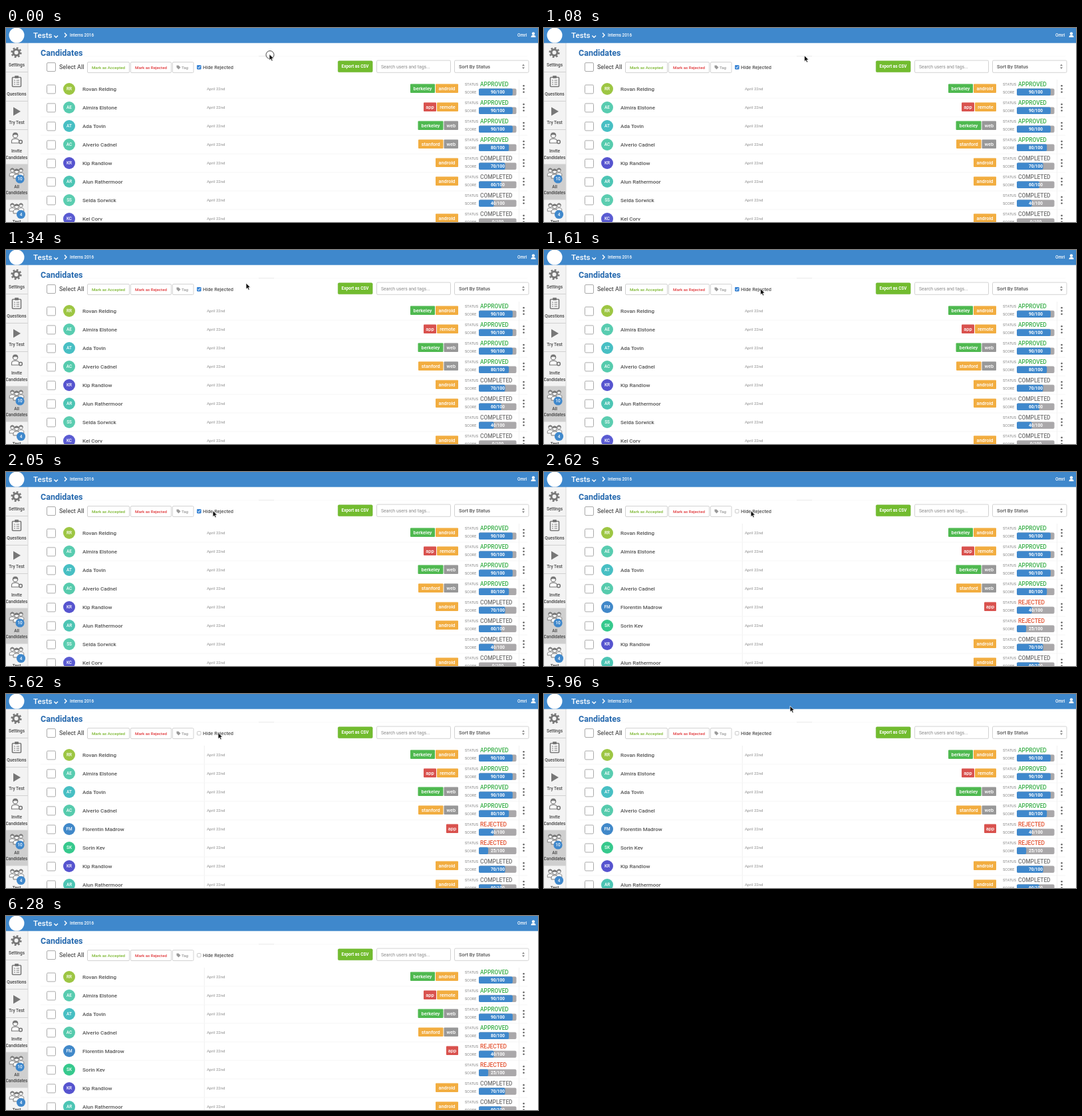
Write an HTML page that moves like this. It is 800 by 293 pixels and loops after 7.62 s.

```html
<!DOCTYPE html>
<html lang="en">
<head>
<meta charset="utf-8">
<title>Candidates</title>
<style>
  html, body { margin: 0; width: 100%; height: 100%; overflow: hidden; background: #fff; }
  svg { display: block; width: 100%; height: 100%; font-family: Roboto, "Open Sans", sans-serif; font-weight: 500; }
</style>
</head>
<body>
<svg id="stage" viewBox="0 0 800 293"></svg>
<script>
const LOOP = 7620;
const BLUE = '#3f88cc', GREEN = '#4fb950', ORANGE = '#f2ad40', RED = '#d9524e', GREY = '#989898';
const BOLD = 'font-weight="600"', PLAIN = 'font-weight="400"';
const TAG_COLORS = { berkeley: GREEN, android: ORANGE, app: RED, remote: ORANGE, web: GREY, stanford: ORANGE };
const STATUS_COLORS = { APPROVED: '#35ad45', REJECTED: '#e4512f', COMPLETED: '#727272' };

// Tags are [name, left, right].
const android = ['android', 646, 680], web = ['web', 658.5, 680];
const candidates = [
  ['Rovan Relding', '#9dc643', 'APPROVED', 90, [['berkeley', 608, 645], android]],
  ['Almira Elstone', '#58ccb0', 'APPROVED', 90, [['app', 628, 647], ['remote', 648, 680]]],
  ['Ada Tovin', '#47bfc3', 'APPROVED', 90, [['berkeley', 619.5, 657.5], web]],
  ['Alverio Cadnel', '#56cbad', 'APPROVED', 80, [['stanford', 620, 657.5], web]],
  ['Florentin Madrow', '#4088c9', 'REJECTED', 40, [['app', 662, 680]]],
  ['Sorin Kev', '#36c98d', 'REJECTED', 25, []],
  ['Kip Randlow', '#5654cf', 'COMPLETED', 70, [android]],
  ['Alun Rathermoor', '#4cc5b4', 'COMPLETED', 60, [android]],
  ['Selda Sorwick', '#5bcdb0', 'COMPLETED', 40, []],
  ['Kel Corv', '#5a5bd2', 'COMPLETED', 0, [android]]
].map(([name, color, status, score, tags]) => ({ name, color, status, score, tags }));

const rect = (x, y, w, h, fill, more = '') =>
  `<rect x="${x}" y="${y}" width="${w}" height="${h}" fill="${fill}" ${more}/>`;
const circle = (x, y, r, fill, more = '') =>
  `<circle cx="${x}" cy="${y}" r="${r}" fill="${fill}" ${more}/>`;
const path = (d, more) => `<path d="${d}" ${more}/>`;
const text = (x, y, size, fill, content, more = '') =>
  `<text x="${x}" y="${y}" font-size="${size}" fill="${fill}" ${more}>${content}</text>`;
const centred = (x, y, size, fill, content, more = '') =>
  text(x, y, size, fill, content, 'text-anchor="middle" ' + more);
const box = (x, y, w, h, stroke = '#d2d2d2', fill = '#fff') =>
  rect(x, y, w, h, fill, `stroke="${stroke}" rx="1.5"`);
const line = (d, stroke, width = 1) =>
  path(d, `fill="none" stroke="${stroke}" stroke-width="${width}"`);

function row(person, index) {
  const y = 92 + index * 28;
  const initials = person.name.split(' ').map(word => word[0]).join('');
  const tags = person.tags.map(([name, left, right]) =>
    rect(left, y - 7.6, right - left, 13.6, TAG_COLORS[name], 'rx="1"') +
    centred((left + right) / 2, y + 1.5, 7.4, '#fff', name)).join('');
  return line(`M52 ${y + 14}H784`, '#f6f6f6') + box(61.5, y - 6, 13, 13, '#aaa') +
    circle(95, y, 9, person.color) + centred(95, y + 2.4, 6.4, '#fff', initials) +
    text(115, y + 3.2, 8, '#555', person.name) +
    text(302, y + 1.5, 6, '#a4a4a4', 'April 22nd') + tags +
    text(690, y - 4.8, 5.6, '#808080', 'STATUS', PLAIN) +
    text(690, y + 7, 5.6, '#808080', 'SCORE', PLAIN) +
    text(713, y - 4, 8.4, STATUS_COLORS[person.status], person.status) +
    rect(711, y - .6, 56.5, 10.6, '#aaa8aa', 'rx="2"') +
    rect(711, y - .6, 56.5 * person.score / 100, 10.6, BLUE, 'rx="2"') +
    centred(739.5, y + 6.9, 6.5, '#fff', person.score + '/100', BOLD) +
    [-4.7, 0, 4.7].map(dy => circle(778.5, y + dy, 1.3, '#666')).join('');
}

const person = (x, y, scale = 1) => `<g transform="translate(${x} ${y}) scale(${scale})" stroke="#777">` +
  path('M-5 8V5Q-5 2 0 2Q5 2 5 5V8Z', 'fill="#f8f8f8"') + circle(0, -2.5, 3.3, '#f8f8f8') +
  path('M-3.3 -3Q-3 -6 0 -6Q3 -6 3.3 -3Q0 -5 -3.3 -3Z', 'fill="#777"') + '</g>';
const people = y => person(9.5, y - 1, .85) + person(22.5, y - 1, .85) + person(16, y + 1);
const badge = (x, y, n) => circle(x, y, 6.6, BLUE) + centred(x, y + 2.4, 6.4, '#fff', n);

function sidebar() {
  const label = (y, content) => centred(16, y, 6.5, '#444', content);
  const gear = circle(15.5, 37, 6.8, 'none', 'stroke="#777" stroke-width="2.6" stroke-dasharray="2.67"') +
    circle(15.5, 37, 4.5, 'none', 'stroke="#777" stroke-width="3"');
  const clipboard = rect(9.5, 74.5, 13, 14, '#f8f8f8', 'stroke="#777" stroke-width="1.6" rx="1"') +
    rect(13, 72, 6, 4, '#777', 'rx="1"') +
    line('M12 79H14M15.5 79H20M12 82H14M15.5 82H20M12 85H14M15.5 85H20', '#777', 1.1);
  return rect(0, 22, 33, 271, '#f3f3f3') + rect(0, 206, 33, 53, '#cfcfcf') +
    line('M0 66.5H33M0 110.5H33M0 153.5H33M0 206H33M0 259H33', '#d0d0d0') +
    line('M33 22V293', '#d6d6d6') +
    gear + label(58, 'Settings') + clipboard + label(101.5, 'Questions') +
    path('M11 119.5L22 126L11 132.5Z', 'fill="#777"') + label(145, 'Try Test') +
    person(14, 165, 1.1) + circle(22, 172, 2.4, '#f3f3f3', 'stroke="#777" stroke-width="1.5"') +
    label(188, 'Invite') + label(198, 'Candidates') +
    people(218) + badge(21, 228, 10) + label(242, 'All') + label(251, 'Candidates') +
    people(271) + badge(22.5, 281.5, 4) + label(295, 'Test');
}

function header() {
  return rect(0, 0, 800, 22.7, BLUE) + circle(16, 11, 11.5, '#fff') +
    text(41, 15.2, 11.6, '#fff', 'Tests') +
    line('M72.4 11.4L75.2 14.2L78 11.4', '#fff', 1.4) + line('M88 7.5L91 10.7L88 14', '#fff', 1.4) +
    text(96, 13, 6.4, '#fff', 'Interns 2016') + text(769, 13, 6.6, '#fff', 'Omri') +
    circle(793, 8.5, 2.2, '#fff') + path('M789.5 14Q789.5 10.8 793 10.8Q796.5 10.8 796.5 14Z', 'fill="#fff"');
}

function toolbar() {
  return text(52, 42, 12.5, '#2468ae', 'Candidates', BOLD) +
    line('M52 42.5H784', '#f6f6f6', .6) + line('M380 42.5H403', '#ddd', .6) +
    box(61.5, 52.5, 13, 13, '#aaa') + text(80, 62.3, 8.9, '#555', 'Select All') +
    box(122.5, 51.5, 63, 16) + centred(154, 61.5, 6.2, '#79b52c', 'Mark as Accepted') +
    box(187.5, 51.5, 61, 16) + centred(218, 61.5, 6.2, '#e0373a', 'Mark as Rejected') +
    box(250.5, 51.5, 31.5, 16) + text(264, 61.5, 6.2, '#999', 'Tag') +
    path('M256.5 56.5H259.5L262.5 59.5L259.5 62.5L256.5 59.5Z', 'fill="#999"') +
    text(296, 62, 7.4, '#555', 'Hide Rejected') +
    rect(499.3, 49.8, 51.8, 16.8, '#72bc2f', 'rx="1.5" stroke="#69b02b" stroke-width=".6"') +
    centred(525, 60.4, 6.4, '#fff', 'Export as CSV', BOLD) +
    box(557.5, 49, 111, 18.3) + text(564, 60.8, 6.9, '#8a8a8a', 'Search users and tags...', PLAIN) +
    box(674.5, 49, 111.5, 18.3) + text(681, 60.8, 7.4, '#555', 'Sort By Status') +
    path('M776 57.3L778 54.6L780 57.3ZM776 59.3L778 62L780 59.3Z', 'fill="#888"');
}

const visible = candidates.filter(person => person.status !== 'REJECTED');
document.getElementById('stage').innerHTML =
  rect(0, 0, 800, 293, '#fff') + toolbar() +
  line('M771.5 78V293', '#f1f1f1') +
  `<g id="filtered">${visible.map(row).join('')}</g>` +
  `<g id="everyone">${line('M298.3 78V293', '#f0f0f0')}${candidates.slice(0, 8).map(row).join('')}</g>` +
  rect(287.5, 56.5, 5.5, 5.5, '#fff', 'stroke="#bbb" stroke-width=".8" rx="1"') +
  `<g id="check">${rect(287, 56, 6.5, 6.5, '#3b86d6', 'rx="1.2"')}${line('M288.5 59.3L289.8 60.8L292 57.6', '#fff', 1)}</g>` +
  sidebar() + header() +
  `<g id="cursor">${circle(1, 1, 6, 'none', 'id="ring" stroke="#333" stroke-width=".9"')}` +
  path('M0 0V9.2L2.1 7.3L3.6 10.4L5.2 9.7L3.8 6.6H6.6Z', 'fill="#111" stroke="#fff" stroke-width=".7"') + '</g>';

const [filtered, everyone, check, cursor, ring] =
  ['filtered', 'everyone', 'check', 'cursor', 'ring'].map(id => document.getElementById(id));

// The pointer jumps at these times, along the path of [time, x, y] below.
const steps = [0, 1080, 1160, 1250, 1340, 1430, 1520, 1610, 1700, 1790, 1880, 1960, 2050,
  5620, 5730, 5840, 5960, 6110];
const route = [[0, 396, 39.5], [1000, 396, 39.5], [1080, 391.5, 41.5], [1250, 376, 46], [1430, 346, 54],
  [1610, 325.5, 58.5], [1790, 316, 59.5], [2050, 311, 58.5], [5500, 311, 58.5], [5620, 319, 58.5],
  [5840, 350, 34], [5960, 370, 18], [6110, 384, 6]];

function pointerAt(time) {
  const held = steps.filter(step => step <= time).pop();
  const next = route.findIndex(point => point[0] >= held);
  const b = route[next], a = route[Math.max(0, next - 1)];
  const k = b === a ? 0 : (held - a[0]) / (b[0] - a[0]);
  return [a[1] + (b[1] - a[1]) * k, a[2] + (b[2] - a[2]) * k];
}

const show = (node, on) => node.setAttribute('display', on ? 'inline' : 'none');

function render(time) {
  const hiding = time < 2620;
  show(filtered, hiding);
  show(check, hiding);
  show(everyone, !hiding);
  show(cursor, time < 6280);
  show(ring, time < 90 || (time >= 2320 && time < 2620));
  ring.setAttribute('opacity', time >= 2320 && time < 2440 ? .7 : 1);
  cursor.setAttribute('transform', `translate(${pointerAt(time).join(' ')})`);
}

const start = performance.now();
function tick(now) {
  render(Math.max(0, now - start) % LOOP);
  requestAnimationFrame(tick);
}
render(0);
requestAnimationFrame(tick);
</script>
</body>
</html>
```
